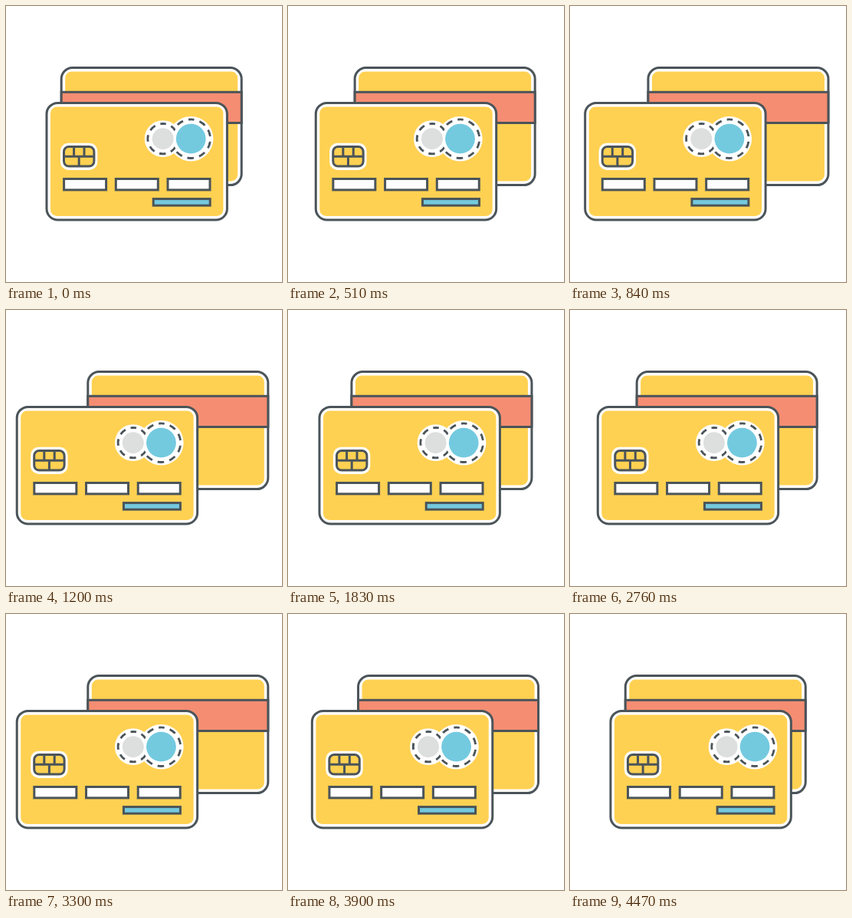
These frames come from a looping animation (360x360 px, 4.5 s). An HTML page:

```html
<!DOCTYPE html>
<html lang="en">
<head>
<meta charset="utf-8">
<title>Two cards</title>
<style>
  html, body { margin: 0; width: 100%; height: 100%; overflow: hidden; background: #fff; }
  svg { display: block; width: 100vw; height: 100vh; }
  .ink { stroke: #4b5459; stroke-width: 3; }
  .white { fill: #fff; }
  .yellow { fill: #ffd152; }
  .salmon { fill: #f58d72; }
  .blue { fill: #73cadf; }
  .grey { fill: #dddfde; }
  .none { fill: none; }
</style>
</head>
<body>
<svg viewBox="0 0 360 360">
  <g id="back">
    <rect class="white ink" x="72.2" y="80.6" width="235" height="153" rx="14.5"/>
    <rect class="yellow" x="77.2" y="85.6" width="225" height="143" rx="8.5"/>
    <rect class="salmon ink" x="72.2" y="112.3" width="235" height="40.2"/>
  </g>
  <g id="front">
    <rect class="white ink" x="53" y="126.4" width="235.4" height="152.6" rx="14.5"/>
    <rect class="yellow" x="58" y="131.4" width="225.4" height="142.6" rx="8.5"/>
    <g id="chip">
      <rect class="white" x="70.9" y="178.7" width="48.4" height="35.2" rx="10.5"/>
      <rect class="yellow ink" x="75.5" y="183.5" width="39.4" height="25.6" rx="6.5"/>
      <path class="none ink" d="M75.5 196.2H114.9M88.6 183.5V196.2M102 183.5V196.2M95.2 196.2V209.1"/>
    </g>
    <g id="discs"></g>
    <g id="fields"></g>
    <rect class="blue ink" x="192.2" y="251.6" width="74" height="8.6"/>
  </g>
</svg>
<script>
const LOOP = 4500, SWING = 2250, STEP = 30;
const $ = id => document.getElementById(id);

function add(parent, tag, attrs) {
  const el = document.createElementNS("http://www.w3.org/2000/svg", tag);
  for (const k in attrs) el.setAttribute(k, attrs[k]);
  parent.appendChild(el);
}

const discs = [
  { cx: 204.6, cy: 173.2, outer: 23.9, ring: 19.6, core: 14, dashes: 8, fill: "grey" },
  { cx: 241.2, cy: 173.2, outer: 29.2, ring: 25.2, core: 19.4, dashes: 10, fill: "blue" }
];

function circle({ cx, cy }, r, attrs) {
  add($("discs"), "circle", { cx, cy, r, ...attrs });
}

// Dashed circle with one dash centred at the top
function dashed(d) {
  const period = 2 * Math.PI * d.ring / d.dashes, dash = period * 0.55;
  circle(d, d.ring, {
    class: "none ink",
    "stroke-dasharray": `${dash} ${period - dash}`,
    "stroke-dashoffset": dash / 2,
    transform: `rotate(-90 ${d.cx} ${d.cy})`
  });
}

// The white insides hide the crossing arcs, leaving one joint dashed outline
discs.forEach(d => circle(d, d.outer, { class: "white" }));
discs.forEach(dashed);
discs.forEach(d => circle(d, d.ring - 1.5, { class: "white" }));
discs.forEach(d => circle(d, d.core, { class: d.fill }));

for (let i = 0; i < 3; i++) {
  add($("fields"), "rect", {
    x: 75.6 + i * 67.7, y: 225.5, width: 55, height: 14.4, class: "white ink"
  });
}

function draw(t) {
  const spread = (1 - Math.cos(2 * Math.PI * t / SWING)) / 2;
  $("front").setAttribute("transform", `translate(${-39.2 * spread} 0)`);
  $("back").setAttribute("transform", `translate(${35 * spread} 0)`);
}

const start = performance.now();
function tick() {
  const t = (performance.now() - start) % LOOP;
  draw(Math.floor(t / STEP) * STEP);
  requestAnimationFrame(tick);
}
draw(0);
requestAnimationFrame(tick);
</script>
</body>
</html>
```
